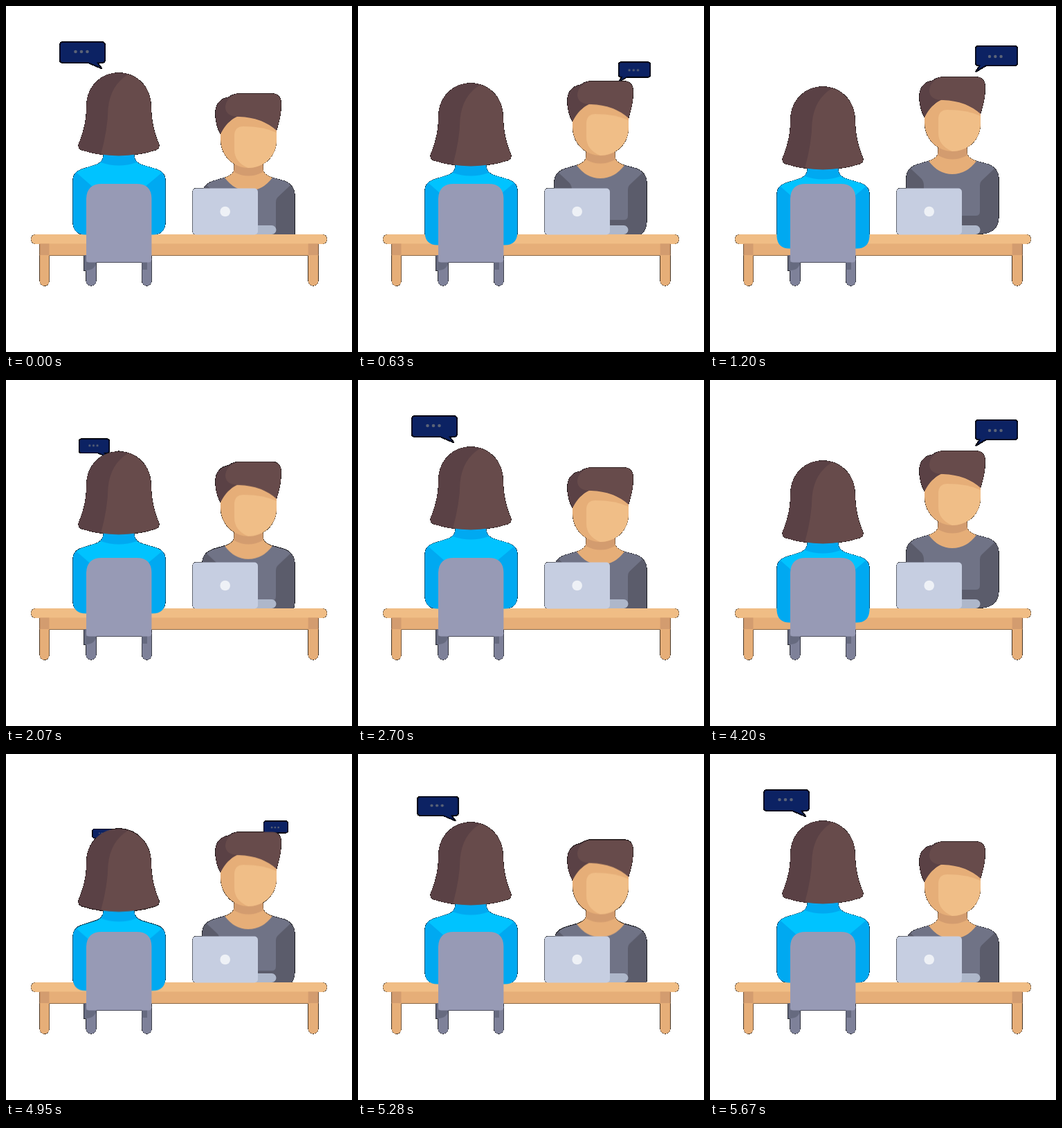
An HTML page that plays this animation: 500 by 500 pixels, repeating every 6030 ms.

```html
<!DOCTYPE html>
<html lang="en">
<head>
<meta charset="utf-8">
<title>Conversation</title>
<style>
html, body { margin: 0; width: 100%; height: 100%; overflow: hidden; background: #fff; }
svg { display: block; width: 100vw; height: 100vh; }

/* --a: she speaks, --b: he speaks; the curve is an exact cubic ease-out */
.move { animation: turns 6.03s cubic-bezier(.33333, 1, .66667, 1) infinite; }
@keyframes turns {
  0%, 4.975%, 44.776%, 54.726%, 94.527%, 100% { transform: var(--a); }
  19.900%, 29.851%, 69.652%, 79.602% { transform: var(--b); }
}
.woman { --a: translateY(0px); --b: translateY(20px); }
.man { --a: translateY(0px); --b: translateY(-24px); }
.her-bubble { --a: scale(1); --b: scale(0); transform-origin: 160px 150px; }
.his-bubble { --a: scale(0); --b: scale(1); transform-origin: 357px 151px; }

.bubble { fill: #0c2263; stroke: #050a1e; stroke-width: 1.6; stroke-linejoin: round; }
.dots { fill: #5b6377; }
.hair { fill: #674b4b; }
.hair-dark { fill: #5a4145; }
.skin { fill: #f0be87; }
.skin-mid { fill: #e6ae78; }
.skin-dark { fill: #d39c6f; }
.blue { fill: #00c3ff; }
.blue-dark { fill: #00a9f1; }
.grey { fill: #707386; }
.grey-dark { fill: #5b5c6b; }
.wood { fill: #f0bd85; }
.wood-mid { fill: #e6ae78; }
.wood-dark { fill: #d39c6f; }
.chair { fill: #979ab5; }
.leg { fill: #7e8199; }
.leg-dark { fill: #666a7f; }
</style>
</head>
<body>
<svg viewBox="0 0 500 500">
  <!-- soft edge pixels are backed with solid black, which leaves a thin jagged rim -->
  <filter id="rim" filterUnits="userSpaceOnUse" x="0" y="0" width="500" height="500" color-interpolation-filters="sRGB">
    <feComponentTransfer in="SourceAlpha" result="hard">
      <feFuncA type="discrete" tableValues="0 1 1 1 1 1 1 1"/>
    </feComponentTransfer>
    <feMerge><feMergeNode in="hard"/><feMergeNode in="SourceGraphic"/></feMerge>
  </filter>

  <g filter="url(#rim)">
    <g class="move her-bubble">
      <path class="bubble" d="M82 52.200H138.500Q143 52.200 143 57V77.500Q143 82 138 82H132L138 90L119 82H82.500Q78 82 78 77.500V57Q78 52.200 82 52.200Z"/>
      <g class="dots"><circle cx="100.500" cy="66" r="2.300"/><circle cx="109" cy="66" r="2.300"/><circle cx="117.500" cy="66" r="2.300"/></g>
    </g>
    <g class="move his-bubble">
      <path class="bubble" d="M388 58H440Q444 58 444 62V82.500Q444 86 440 86H399L384.500 94.500L390 86H388Q384 86 384 82V62Q384 58 388 58Z"/>
      <g class="dots"><circle cx="404" cy="73" r="2.200"/><circle cx="412.300" cy="73" r="2.200"/><circle cx="420.600" cy="73" r="2.200"/></g>
    </g>

    <g class="move man">
      <path class="grey-dark" d="M316 248L299 253Q283.500 258 283.500 273V340Q285 353.500 300 353.500H392Q416 352 417.300 330V273Q417 259 403 253L385 248Z"/>
      <path class="grey" d="M316 248L299 253Q294 255 290 259L305 273Q309 277 309 284V327H384Q390 327 390 321V284Q390 278 394 275L411 259Q408 255 403 253L385 248Z"/>
      <path class="skin-mid" d="M329.600 230V235Q330 243 316 248Q330 267 350 267Q371 267 385 248Q371 243 371.400 235V230Z"/>
      <path class="skin-dark" d="M329.600 220V240Q350 251 371.400 240V220Z"/>
      <path class="skin-mid" d="M310 178V193C310.500 218 330 234 350 234C372 234 391 218 391 193V176L340 152Z"/>
      <path class="skin" d="M330 186Q331 174 343 174Q372 174 391 183V193C391 218 372 234 350 234Q330 226 330 207Z"/>
      <path class="hair-dark" d="M334 126.500Q326 128 322 131.500Q302.500 135 302.500 155Q302.500 172 310 185Q320 165 336 159L350 140Z"/>
      <path class="hair" d="M334 126.500H385Q397.600 127 397.600 141C397.600 160 394 168 391 180Q370 161 337 160Q318 160 317 147Q317 133 334 126.500Z"/>
    </g>

    <rect class="wood" x="36.200" y="330" width="427.600" height="14" rx="6.500"/>
    <rect class="wood-mid" x="48.700" y="343.500" width="402.600" height="17.100"/>
    <path class="wood-mid" d="M48.700 359H62.500V397.500a6.900 6.900 0 0 1-13.800 0ZM436.700 359H451.300V397a7.300 7.300 0 0 1-14.600 0Z"/>
    <path class="wood-dark" d="M48.700 343.500H62.500V360H48.700ZM436.700 343.500H451.300V360H436.700Z"/>

    <path fill="#aeb7ca" d="M355 317H384a6.500 6.500 0 0 1 0 13H355Z"/>
    <rect fill="#c6cee1" x="269.500" y="263.500" width="94.500" height="67" rx="5"/>
    <circle fill="#eef1f6" cx="316.700" cy="297" r="7.300"/>

    <g class="move woman">
      <path class="blue-dark" d="M140.600 208V217Q140 226 128 230L109 236Q96.500 240 96.500 253V313Q97.500 330.500 115 330.500H212Q229.500 330.500 230.500 313V253Q230.500 240 218 236L198 230Q186 226 185.400 217V208Z"/>
      <path class="blue" d="M137 226Q133 229 128 230L109 236Q105 238 102 241L126 262V330H200V262L225 241Q222 238 218 236L198 230Q193 229 189 226Q163 235 137 226Z"/>
      <path class="hair" d="M163 96.500C137 96.500 117 117 116.500 143C116.500 165 112.500 182 104.800 200Q103.500 205 109 208Q135 216.400 163 216.400Q191 216.400 217 208Q222.500 205 221.200 200C213.500 182 210 165 209.600 143C209 117 189 96.500 163 96.500Z"/>
      <path class="hair-dark" d="M163 96.500C137 96.500 117 117 116.500 143C116.500 165 112.500 182 104.800 200Q103.500 205 109 208Q122 212 137 214.500Q147 179 147.500 148Q151 114 177 98.500Q170 96.500 163 96.500Z"/>
    </g>

    <path class="leg-dark" d="M112.600 360H118V382.400H112.600Z"/>
    <path class="leg" d="M115.700 365H130.400V397a7.350 7.350 0 0 1-14.700 0ZM196.500 365H210.500V397.400a7 7 0 0 1-14 0Z"/>
    <path class="leg-dark" d="M115.700 370H130.400Q129 382 115.700 382ZM196.500 370H204V381H196.500Z"/>
    <path class="chair" d="M116 278Q117 257 138 257H189Q210 257 210.400 278V366Q210 370.500 206 370.500H120.500Q116 370.500 116 366Z"/>
  </g>
</svg>
</body>
</html>
```
